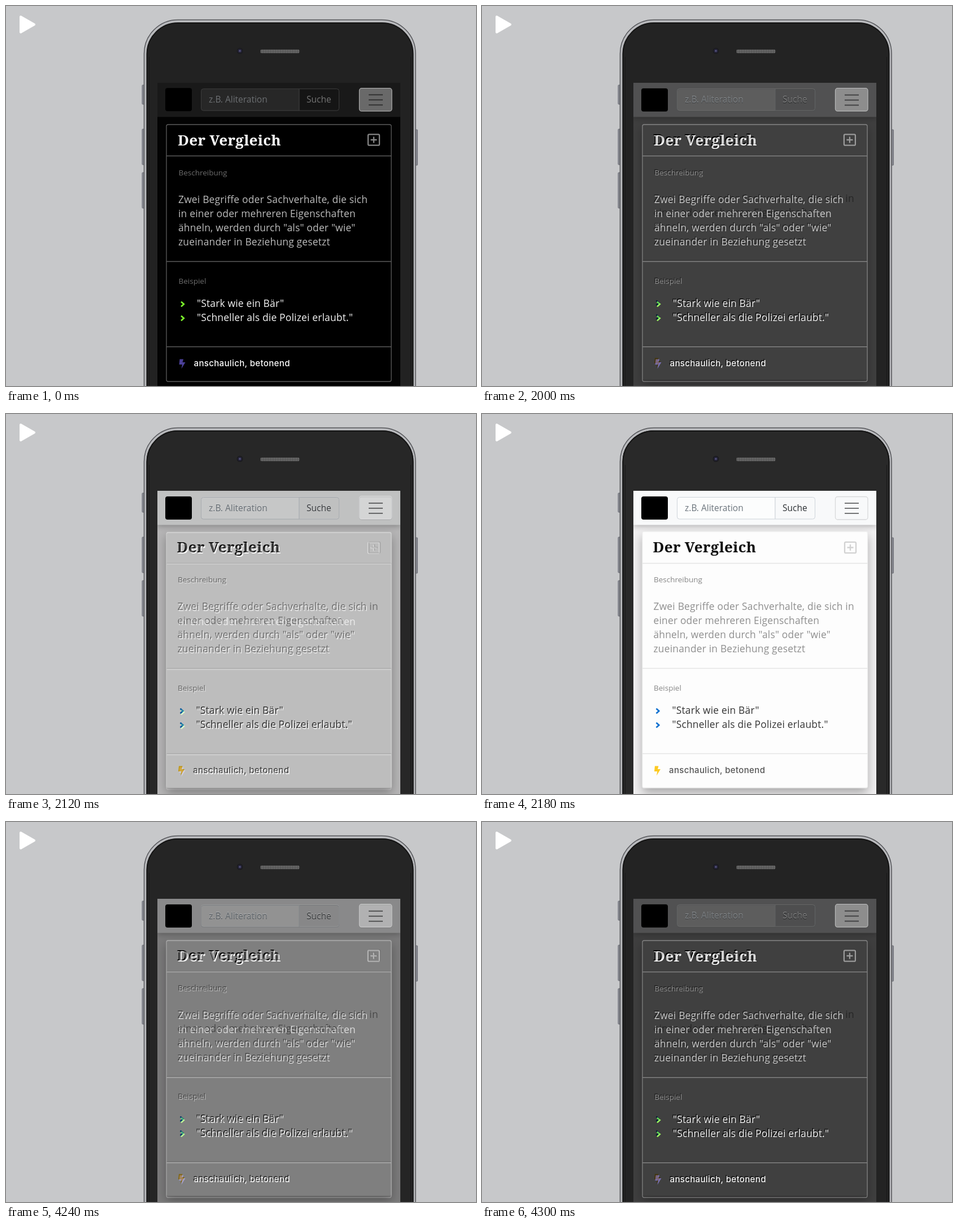
An HTML page that plays this animation: 832 by 673 pixels, repeating every 4360 ms.

```html
<!DOCTYPE html>
<html lang="de">
<head>
<meta charset="utf-8">
<title>Hell und dunkel</title>
<style>
  html, body { margin: 0; width: 100%; height: 100%; overflow: hidden; background: #c7c8ca; }
  svg { display: block; }
  .title { font: 700 26px "Noto Serif", serif; letter-spacing: .3px; }
  .label { font: 13.5px "Open Sans", sans-serif; }
  .nav { font: 15.5px "Open Sans", sans-serif; }
  .body { font: 17.4px "Open Sans", sans-serif; letter-spacing: .2px; }
  .foot { font: 500 15px Inter, sans-serif; letter-spacing: .36px; }
</style>
</head>
<body>
<svg id="stage" width="832" height="673" viewBox="0 0 832 673">
  <defs>
    <pattern id="mesh" width="3" height="3" patternUnits="userSpaceOnUse">
      <rect width="3" height="3" fill="#4c4c4c"/>
      <circle cx="1.5" cy="1.5" r=".9" fill="#8a8a8a"/>
    </pattern>
    <filter id="blur" x="-20%" y="-20%" width="140%" height="140%">
      <feGaussianBlur stdDeviation="9"/>
    </filter>
    <filter id="navBlur" x="-10%" y="-50%" width="120%" height="220%">
      <feGaussianBlur stdDeviation="6"/>
    </filter>
    <clipPath id="screen"><rect x="268" y="136" width="430" height="540"/></clipPath>
  </defs>
  <rect width="832" height="673" fill="#c7c8ca"/>
  <path d="M26 19V46.500L50 32.700Z" fill="#fff" stroke="#fff" stroke-width="4" stroke-linejoin="round"/>
  <g id="buttons" fill="#898b92" stroke="#6d6f76"></g>
  <rect x="244.500" y="24.500" width="480.500" height="760" rx="60" fill="#b9babd" stroke="#55565a" stroke-width="1.500"/>
  <g id="dark"></g>
  <g id="light" opacity="0"></g>
</svg>
<script>
const $ = id => document.getElementById(id);

const themes = {
  dark: {
    dx: 0, dy: 0, navDy: -.8, bezel: '#222', screen: '#030303', nav: '#191919',
    input: '#272727', inputLine: '#3d3d3d', button: '#151515', hint: '#6c6f72', search: '#747474',
    toggle: '#696969', toggleLine: '#a8a8a8', bars: '#333',
    card: '#000', cardLine: '#5c5c5c', rule: '#5c5c5c', plus: '#858585',
    title: '#fff', label: '#6c6c6c', body: '#bcbcbc', list: '#f4f4f4', foot: '#fff',
    arrow: '#7dfb2c', bolt: '#4b4098', shadow: 0,
    cardBox: [284, 210, 398, 455], rules: [265.5, 452.5, 603.5], plusAt: [651, 237],
    lines: ['Zwei Begriffe oder Sachverhalte, die sich', 'in einer oder mehreren Eigenschaften']
  },
  light: {
    dx: -1.5, dy: -2, navDy: 0, bezel: '#292929', screen: '#f1f0f1', nav: '#f8f9fa',
    input: '#fcfdfd', inputLine: '#ced4da', button: '#f8f9fa', hint: '#6c757d', search: '#2b2f33',
    toggle: '#f8f9fa', toggleLine: '#d8d9da', bars: '#747576',
    card: '#fdfdfd', cardLine: '#f0f0f0', rule: '#e4e4e4', plus: '#d2d2d2',
    title: '#0c0c0c', label: '#878787', body: '#8f8f8f', list: '#363636', foot: '#555',
    arrow: '#0a6fd0', bolt: '#fdca22', shadow: .3,
    cardBox: [284, 208, 398.5, 454], rules: [264.5, 450.5, 601.5], plusAt: [652, 236.5],
    lines: ['Zwei Begriffe oder Sachverhalte, die sich in', 'einer oder mehreren Eigenschaften']
  }
};

const text = (cls, x, y, fill, s) => `<text class="${cls}" x="${x}" y="${y}" fill="${fill}">${s}</text>`;
const rect = (x, y, w, h, fill, extra = '') =>
  `<rect x="${x}" y="${y}" width="${w}" height="${h}" fill="${fill}" ${extra}/>`;
const path = (d, stroke, width, extra = '') =>
  `<path d="${d}" fill="none" stroke="${stroke}" stroke-width="${width}" ${extra}/>`;

function phone(t) {
  return rect(249.5, 30, 471, 750, t.bezel, 'rx="55" stroke="#141414" stroke-width="2"') +
    path('M253.5 673V90M716.500 673V90', '#181818', 1) +
    rect(450.5, 77, 69, 6.5, 'url(#mesh)', 'rx="2"') +
    '<circle cx="414" cy="79.500" r="5.500" fill="#1b1b20"/>' +
    '<circle cx="414" cy="79.500" r="3.300" fill="#2b2a44"/>' +
    '<circle cx="414" cy="79.500" r="1.300" fill="#64628f"/>' +
    rect(268, 136, 430, 540, t.screen);
}

function navbar(t) {
  const line = `stroke="${t.inputLine}"`;
  return rect(268, 136, 430, 62, '#000', `opacity="${t.shadow}" filter="url(#navBlur)"`) +
    rect(268, 136, 430, 60.5, t.nav) +
    `<g transform="translate(0 ${t.navDy})">` +
    rect(282, 146, 47, 41, '#000', 'rx="4"') +
    `<path d="M519 147.500H349.500a4 4 0 0 0-4 4V182a4 4 0 0 0 4 4H519Z" fill="${t.input}" ${line}/>` +
    `<path d="M519 147.500H585.500a4 4 0 0 1 4 4V182a4 4 0 0 1-4 4H519Z" fill="${t.button}" ${line}/>` +
    text('nav', 359, 172, t.hint, 'z.B. Aliteration') +
    text('nav', 532, 172, t.search, 'Suche') +
    rect(625.5, 146.5, 57.5, 40.5, t.toggle, `rx="4" stroke="${t.toggleLine}" stroke-width="1.300"`) +
    path('M642 158H667M642 167H667M642 176H667', t.bars, 2) + '</g>';
}

function card(t) {
  const [x, y, w, h] = t.cardBox, [px, py] = t.plusAt;
  const arrow = cy => path(`M310 ${cy - 4.3}L314.800 ${cy}L310 ${cy + 4.3}`, t.arrow, 2.6);
  const lines = [...t.lines, 'ähneln, werden durch "als" oder "wie"', 'zueinander in Beziehung gesetzt'];
  return rect(x, y + 9, w, h, '#000', `opacity="${t.shadow}" filter="url(#blur)"`) +
    rect(x, y, w, h, t.card, `rx="3" stroke="${t.cardLine}" stroke-width="1.300"`) +
    t.rules.map(r => path(`M${x} ${r}h${w}`, t.rule, 1.3)).join('') +
    rect(px - 10, py - 9.7, 20, 19.4, 'none', `rx="2" stroke="${t.plus}" stroke-width="2.300"`) +
    path(`M${px - 5.5} ${py}h11M${px} ${py - 5.5}v11`, t.plus, 2.3) +
    `<g transform="translate(${t.dx} ${t.dy})">` +
    text('title', 304, 246.5, t.title, 'Der Vergleich') +
    text('label', 305.5, 299.5, t.label, 'Beschreibung') +
    lines.map((s, i) => text('body', 305, 349 + 25 * i, t.body, s)).join('') +
    text('label', 305.5, 491.5, t.label, 'Beispiel') +
    arrow(528) + arrow(553) +
    text('body', 338, 533, t.list, '"Stark wie ein Bär"') +
    text('body', 338, 558, t.list, '"Schneller als die Polizei erlaubt."') +
    `<path d="M307.500 625.500H314L312.500 631H317.500L310.500 642.500L311.800 635H306.500Z" fill="${t.bolt}"/>` +
    text('foot', 332.5, 637.5, t.foot, 'anschaulich, betonend') + '</g>';
}

$('buttons').innerHTML = [[241, 140, 34], [241, 218, 63], [241, 295, 63], [724.5, 219, 63]]
  .map(([x, y, h]) => `<rect x="${x}" y="${y}" width="4" height="${h}" rx="1"/>`).join('');

for (const [id, t] of Object.entries(themes)) {
  $(id).innerHTML = phone(t) + `<g clip-path="url(#screen)">${card(t)}${navbar(t)}</g>`;
}

// Start time in ms, share of the light theme
const steps = [[0, 0], [2000, .25], [2060, .5], [2120, .75], [2180, 1], [4180, .75], [4240, .5], [4300, .25]];
const loop = 4360;

function draw(now) {
  const time = now % loop;
  $('light').setAttribute('opacity', steps.findLast(([start]) => start <= time)[1]);
  requestAnimationFrame(draw);
}
draw(performance.now());
</script>
</body>
</html>
```
